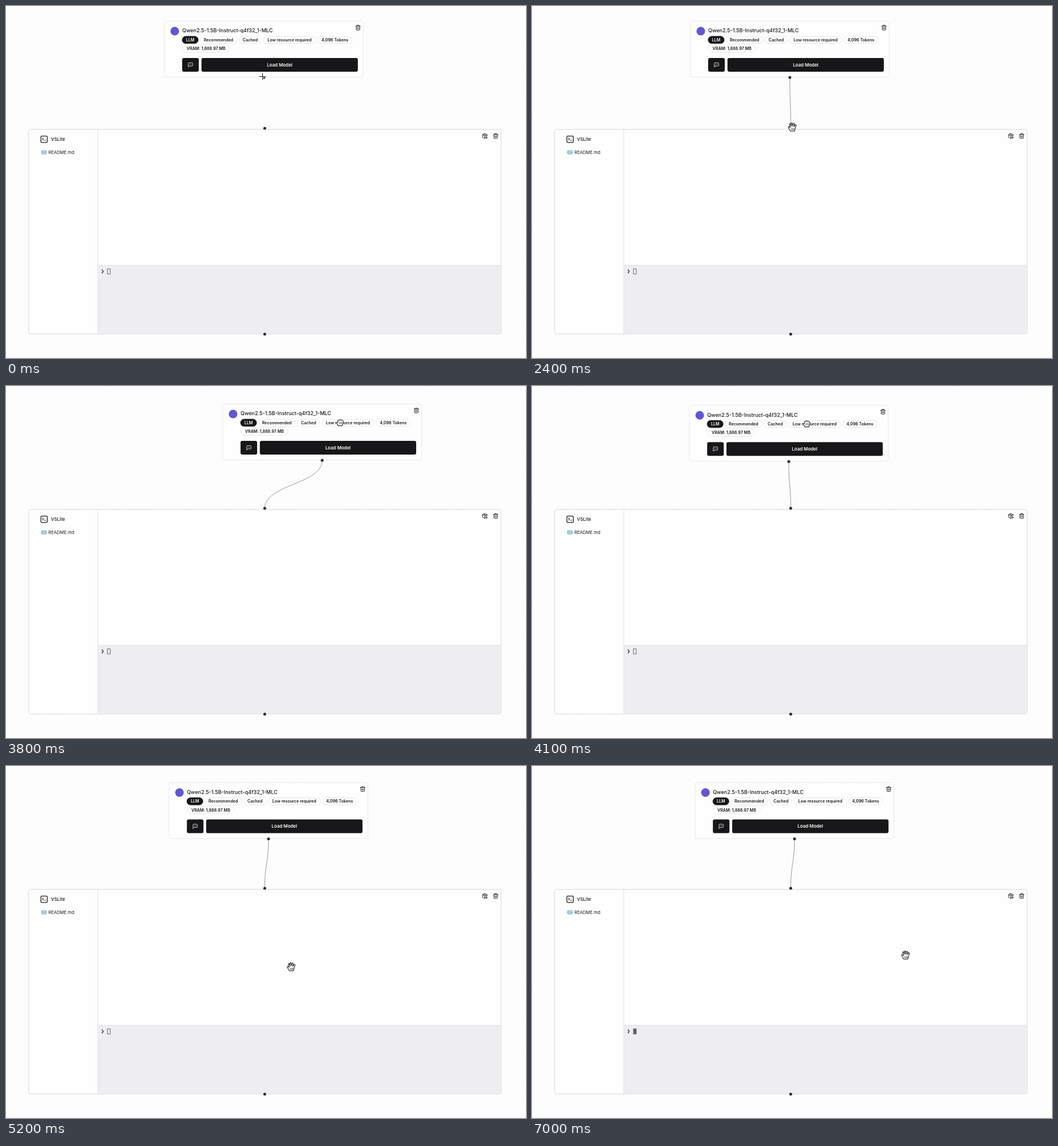
Recreate the animation shown at these times as an HTML page. Size 909x616 px, loop 7.1 s.

```html
<!DOCTYPE html>
<html lang="en">
<head>
<meta charset="utf-8">
<title>Node editor</title>
<style>
  html, body { margin: 0; width: 100%; height: 100%; overflow: hidden; background: #fdfdfe; }
  svg { display: block; }
  text { font-family: Inter, "Liberation Sans", sans-serif; fill: #18181b; }
  .icon { fill: none; stroke: #27272a; stroke-linecap: round; stroke-linejoin: round; }
  .dot { fill: #2b2b36; }
  .pointer path { fill: #fff; stroke: #18181b; stroke-width: 1.1; stroke-linejoin: round; stroke-linecap: round; }
</style>
</head>
<body>
<svg width="909" height="616" viewBox="0 0 909 616">
  <defs>
    <pattern id="grid" x="-5.2" y="2" width="14.375" height="14.375" patternUnits="userSpaceOnUse">
      <circle cx="7.2" cy="7.2" r=".6" fill="#d9d9de"/>
    </pattern>
    <g id="trash" class="icon" stroke-width="1">
      <path d="M-4-2.7H4M-3.1-2.7V3.2Q-3.1 4.2-2.1 4.2H2.1Q3.1 4.2 3.1 3.2V-2.7M-1.5-2.7V-4.2H1.5V-2.7M-1-.5V2.2M1-.5V2.2"/>
    </g>
  </defs>
  <rect width="909" height="616" fill="url(#grid)"/>

  <!-- editor panel -->
  <rect x="39.5" y="216" width="826" height="358" rx="4" fill="#fefefe" stroke="#e4e4e8" stroke-width="1.5"/>
  <path d="M161 454H865V570Q865 573.3 861.5 573.3H161Z" fill="#eeedf0"/>
  <path d="M160.5 216.5V573.5M161 453.8H865" stroke="#e2e2e6" fill="none"/>
  <g class="icon" stroke-width="1.3">
    <rect x="61" y="227.6" width="11.2" height="11.2" rx="1.6" style="stroke:#18181b"/>
    <path d="M63.7 231L65.6 232.7L63.7 234.4M67 235H69.5" stroke-width="1.1"/>
  </g>
  <text x="78.5" y="236.2" font-size="8" font-weight="500">VSLite</text>
  <g fill="none" stroke="#519aba" stroke-width="1">
    <rect x="62.3" y="253.3" width="8" height="5.6" rx=".6" fill="#eef6fa"/>
    <path d="M63.9 257.5V254.9L65.1 256.2L66.3 254.9V257.5M68.4 254.8V257.2M67.4 256.4L68.4 257.5L69.4 256.4" stroke-width=".8"/>
  </g>
  <text x="74" y="258.8" font-size="7.65">README.md</text>
  <g class="icon" stroke-width="1">
    <path d="M837 231.8L833 229.6V225.3L837 223L841 225.3V227M833 225.3L837 227.5L841 225.3M837 227.5V231.8M835 224.2L839 226.4M839.8 228V232M837.9 230H841.7"/>
  </g>
  <use href="#trash" x="856" y="227.5"/>
  <path d="M167.6 461.2L170 464.5L167.6 467.8" fill="none" stroke="#3f3f46" stroke-width="1.5"/>
  <rect id="caret" x="177.3" y="460" width="4.9" height="9" stroke="#6b6b70" stroke-width="1"/>

  <!-- model card -->
  <g id="card">
    <rect x="277" y="26.5" width="347.5" height="98" rx="4" fill="#fefefe" stroke="#e8e8ec"/>
    <circle cx="295" cy="44" r="7.5" fill="#6257d0"/>
    <text x="308" y="46.4" font-size="9" font-weight="500">Qwen2.5-1.5B-Instruct-q4f32_1-MLC</text>
    <use href="#trash" x="615.3" y="37.8"/>
    <g id="pills" font-size="7.1" font-weight="600" text-anchor="middle"></g>
    <rect x="308" y="91" width="29" height="24" rx="3" fill="#171719"/>
    <g class="icon" stroke-width=".9" style="stroke:#e4e4e7">
      <path d="M318.8 106.7V100.2Q318.8 99.4 319.6 99.4H325.5Q326.3 99.4 326.3 100.2V104.2Q326.3 105 325.5 105H320.5ZM320.9 102.2H321M322.5 102.2H322.6M324.1 102.2H324.2"/>
    </g>
    <rect x="341.7" y="91" width="273.3" height="24" rx="3" fill="#171719"/>
    <text x="478.4" y="105.5" font-size="7.9" font-weight="600" text-anchor="middle" style="fill:#fafafa">Load Model</text>
  </g>

  <path id="edge" fill="none" stroke-width="1"/>
  <circle id="handle" class="dot" r="2.5"/>
  <circle class="dot" cx="452.3" cy="214" r="2.5"/>
  <circle class="dot" cx="452.3" cy="574.3" r="2.5"/>

  <g id="pointer" class="pointer">
    <g id="cross"><path d="M-5.5 0H5.5M0-5.5V5.5" style="stroke:#fff;stroke-width:2.6"/><path d="M-5.5 0H5.5M0-5.5V5.5"/></g>
    <g id="open">
      <path d="M-3 7C-4 5-6 2.5-6.8.8C-7.4-.8-5.6-1.2-4.5 0L-3.6 1L-5-4.2C-5.4-6-3.6-6.5-3-4.8L-1.9-1.5L-2-6C-2-7.8.1-7.8.2-6L.4-1.6L1.6-5.8C2-7.4 4-6.9 3.7-5.2L2.9-.9L4.8-3.6C5.8-5 7.4-4 6.6-2.5C5 .8 5 4 3.6 7Z"/>
      <path d="M-1.2 2.2V5M.8 2.2V5M2.8 2.2V5" style="stroke-width:.8"/>
    </g>
    <g id="closed">
      <path d="M-3 5.5C-3.5 4-5.8 2.6-5.6.5C-5.5-.5-4.7-.7-4-.5C-5-3.4-3.2-4.8-1.8-3.8C-1.2-5.4.6-5.4 1.1-4.1C2.2-5 3.5-4.5 3.7-3.2C5-3.6 6-2.5 5.6-.5C5.3 1.6 4.3 3.5 3.6 5.5Z"/>
      <path d="M-1.4-.5V2M.8-.5V2M2.9-.5V2" style="stroke-width:.8"/>
    </g>
    <g id="beam"><path d="M-2.5-7Q0-7 0-5Q0-7 2.5-7M0-5V5M-2.5 7Q0 7 0 5Q0 7 2.5 7" style="fill:none"/></g>
  </g>
</svg>
<script>
const $ = id => document.getElementById(id);
const LOOP = 7100, STEP = 100;

// label, left, top, width
$('pills').innerHTML = [
  ['LLM', 308, 53, 28], ['Recommended', 339, 53, 65], ['Cached', 407.5, 53, 39],
  ['Low resource required', 450, 53, 91.5], ['4,096 Tokens', 545, 53, 60],
  ['VRAM: 1,888.97 MB', 308.5, 68.3, 82.5]
].map(([label, x, y, w], i) => `
  <rect x="${x}" y="${y}" width="${w}" height="12.6" rx="6.3"
    fill="${i ? '#fefefe' : '#171719'}" stroke="${i ? '#e6e6ea' : '#171719'}" stroke-width=".9"/>
  <text x="${x + w / 2}" y="${y + 8.8}" style="fill:${i ? '#18181b' : '#fafafa'}">${label}</text>`).join('');

// time, x, y
const pointerPath = [
  [0, 448.5, 123.5], [600, 450, 125], [1400, 454.7, 197.5], [1600, 455, 206], [1800, 455, 212],
  [2800, 455, 212], [3100, 556, 112], [3300, 489.8, 56], [3600, 482, 59], [3800, 584, 64],
  [4100, 480.3, 66], [4400, 499, 63], [4600, 491, 60.5], [4700, 491, 61], [5200, 498.5, 351.5],
  [5800, 492, 544], [6100, 492, 544], [6700, 653, 331]
];
const cardPath = [
  [3600, 0, 0], [3800, 102, 5], [4100, -1.8, 7.2], [4400, 17, 4], [4600, 5.5, 3.6], [4700, 8.2, 2.5]
];

function along(path, t) {
  const next = path.findIndex(p => p[0] > t);
  if (next < 1) return (next ? path[path.length - 1] : path[0]).slice(1);
  const [t0, x0, y0] = path[next - 1], [t1, x1, y1] = path[next];
  const u = (t - t0) / (t1 - t0), e = u * u * (3 - 2 * u);
  return [x0 + (x1 - x0) * e, y0 + (y1 - y0) * e];
}

function pointerShape(t, y) {
  if (t < 1000 && y < 132) return 'cross';
  if (y > 454) return 'beam';
  return t >= 3600 && t < 4500 ? 'closed' : 'open';
}

function draw(t) {
  const [px, py] = along(pointerPath, t), [dx, dy] = along(cardPath, t);
  const hx = 450.7 + dx, hy = 125 + dy;
  $('card').setAttribute('transform', `translate(${dx} ${dy})`);
  $('handle').setAttribute('cx', hx);
  $('handle').setAttribute('cy', hy);

  const [ex, ey] = t < 1700 ? [px, py] : [452.3, 214], mid = (hy + ey) / 2;
  $('edge').setAttribute('d', t < 700 ? '' : `M${hx} ${hy}C${hx} ${mid} ${ex} ${mid} ${ex} ${ey}`);
  $('edge').setAttribute('stroke', t < 2000 ? '#bdbdc2' : '#96969b');

  $('caret').setAttribute('fill', t >= 5900 ? '#5c5c62' : 'none');
  $('pointer').setAttribute('transform', `translate(${px} ${py})`);
  const shape = pointerShape(t, py);
  for (const id of ['cross', 'open', 'closed', 'beam'])
    $(id).style.display = id === shape ? '' : 'none';
}

function tick() {
  draw(Math.floor(performance.now() % LOOP / STEP) * STEP);
  requestAnimationFrame(tick);
}
tick();
</script>
</body>
</html>
```
